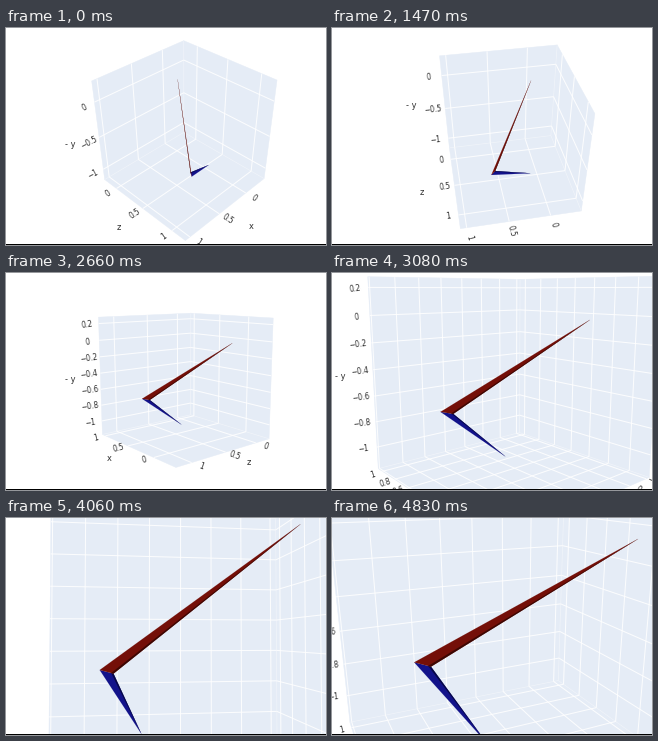
Write a matplotlib script that moves like this. It is 320 px wide and 217 px high and loops after 5.11 s.

```python
import itertools

import numpy as np
import matplotlib.pyplot as plt
from matplotlib.animation import FuncAnimation
from matplotlib.collections import LineCollection

W, H, DPI = 320, 217, 64
PX = 72 / DPI                      # points per pixel
FRAMES, STEP_MS = 73, 70
FOCAL, CENTRE = 473, np.array([178.5, 105.5])

WALL, INK = "#e5ecf6", "#303030"
RED, DARK_RED = "#740f08", "#3a0703"
BLUE, DARK_BLUE = "#12128a", "#070745"

# Data axes on the unit cube: position = ORIGIN + SCALE * value
ORIGIN, SCALE = np.array([-0.24, -0.335, 0.31]), 0.69
TITLES = ("x", "z", "- y")
BASE_EDGE = np.array([-0.039, -0.05, -0.011])

# Rough joint, red tip and blue tip, refined below
POINTS = np.array([[0.18, 0.26, -0.20], [-0.23, -0.30, 0.29], [-0.15, 0.14, -0.34]])

# Rough camera (azimuth, elevation, distance), then screen positions of the
# joint, the red tip and the blue tip, then those of some cube corners
POSES = [
    ((45, 35.3, 3.86), [(186, 147), (172, 56), (203, 137)],
     {"+-+": (85, 53), "--+": (178, 12), "-++": (272, 52),
      "-+-": (259, 150), "++-": (180, 212), "+--": (98, 150)}),
    ((79, 42, 3.86), [(161, 146), (197, 56), (200, 146)],
     {"+-+": (108, 28), "--+": (226, 17), "-++": (264, 86),
      "-+-": (250, 183), "++-": (128, 200)}),
    ((102.5, 22.5, 3.9), [(150, 136), (212, 63), (194, 152)],
     {"+++": (97, 60), "+-+": (135, 31), "--+": (246, 36),
      "-+-": (234, 195), "++-": (104, 183)}),
    ((133, 9, 2.5), [(114, 140), (259, 45), (175, 185)],
     {"+++": (37, 3), "+-+": (188, 10), "+--": (190, 155), "++-": (46, 198)}),
    ((163, 0.5, 1.62), [(95, 152), (301, 10), (143, 219)],
     {"++-": (25, 227), "+--": (250, 209)}),
    ((182, -4.6, 1.62), [(111, 156), (282, 0), (127, 214)],
     {"+++": (70, 8), "+-+": (293, 8)}),
    ((150, 20, 1.62), [(90, 147), (308, 19), (153, 220)], {}),
]


def camera_axes(cam):
    (sa, se), (ca, ce) = np.sin(cam[:2]), np.cos(cam[:2])
    eye = np.array([ca * ce, sa * ce, se])
    right = np.array([-sa, ca, 0])
    up = np.array([-ca * se, -sa * se, ce])
    return eye, right, up


def project(points, cam):
    """cam is azimuth, elevation (radians) and log distance."""
    eye, right, up = camera_axes(cam)
    points = np.asarray(points, float)
    zoom = FOCAL / (np.exp(cam[2]) - points @ eye)
    flat = np.stack([points @ right, -(points @ up)], axis=-1)
    return CENTRE + flat * zoom[..., None]


def corner(signs):
    return [0.5 if s == "+" else -0.5 for s in signs]


def calibrate():
    """Refine cameras and points together by Gauss-Newton least squares."""
    cams = [(np.radians(a), np.radians(e), np.log(d)) for (a, e, d), *_ in POSES]
    start = np.concatenate([np.ravel(cams), POINTS.ravel()])
    split = 3 * len(POSES)

    def errors(p):
        points = p[split:].reshape(3, 3)
        out = [30 * (p - start)]
        for cam, (_, tips, corners) in zip(p[:split].reshape(-1, 3), POSES):
            world = list(points) + [corner(c) for c in corners]
            seen = np.array(tips + list(corners.values()))
            out.append((project(world, cam) - seen).ravel())
        return np.concatenate(out)

    p, h = start.copy(), 1e-5
    for _ in range(12):
        r = errors(p)
        jac = np.array([(errors(p + h * e) - r) / h for e in np.eye(p.size)]).T
        p = p - np.linalg.lstsq(jac, r, rcond=None)[0]
    return p[:split].reshape(-1, 3), p[split:].reshape(3, 3)


cams, (joint, red_tip, blue_tip) = calibrate()
turned = np.array([*cams[3][:2], cams[2][2]])
zoomed = turned + 1.2 * (cams[3] - turned)
PATH = [(0, cams[0]), (630, cams[0]), (1470, cams[1]), (2170, cams[2]),
        (2520, turned), (2730, turned), (3150, zoomed), (3360, zoomed),
        (3780, cams[4]), (4410, cams[5]), (4830, cams[6])]
PATH_TIMES = [t for t, _ in PATH]
PATH_CAMS = np.array([c for _, c in PATH])


def camera_at(ms):
    return np.array([np.interp(ms, PATH_TIMES, PATH_CAMS[:, i]) for i in range(3)])


def ticks(axis, step):
    low, high = (np.array([-0.5, 0.5]) - ORIGIN[axis]) / SCALE
    return [round(k * step, 1) + 0.0
            for k in range(int(np.ceil(low / step)), int(np.floor(high / step)) + 1)]


def at(axis, value):
    return ORIGIN[axis] + SCALE * value


def with_axis(point, axis, value):
    moved = np.array(point, float)
    moved[axis] = value
    return moved


fig = plt.figure(figsize=(W / DPI, H / DPI), dpi=DPI, facecolor="white")
ax = fig.add_axes([0, 0, 1, 1])


def draw_faces(cam, back, steps):
    grid, edges = [], []
    for axis in range(3):
        i, j = [k for k in range(3) if k != axis]

        def on_face(u, v):
            p = np.empty(3)
            p[[axis, i, j]] = back[axis], u, v
            return p

        square = [on_face(u, v) for u, v in
                  ((-0.5, -0.5), (0.5, -0.5), (0.5, 0.5), (-0.5, 0.5))]
        ax.fill(*project(square, cam).T, color=WALL, lw=0.5)
        for t in ticks(i, steps[i]):
            grid.append(project([on_face(at(i, t), v) for v in (-0.5, 0.5)], cam))
        for t in ticks(j, steps[j]):
            grid.append(project([on_face(u, at(j, t)) for u in (-0.5, 0.5)], cam))
        edges.append(project([with_axis(back, axis, v) for v in (-0.5, 0.5)], cam))
    for lines, lw, alpha in ((grid, 1.05, 0.85), (edges, 0.7, 0.4)):
        ax.add_collection(LineCollection(lines, colors="white", alpha=alpha,
                                         linewidths=lw * PX), autolim=False)


def draw_spike(cam, tip, color, dark):
    a, b, t = project([joint - BASE_EDGE / 2, joint + BASE_EDGE / 2, tip], cam)
    for shape, fill in (([a, b, t], color), ([b, b + 0.16 * (a - b), t], dark)):
        ax.fill(*np.transpose(shape), color=fill, lw=0.1, zorder=3)


def write(pos, text, size, angle=0):
    if -20 < pos[0] < W + 20 and -20 < pos[1] < H + 20:
        ax.text(*pos, text, color=INK, fontsize=size * PX, rotation=angle,
                family="DejaVu Sans", ha="center", va="center")


def draw_axis(cam, axis, middle, outward, step):
    """Tick labels and title along the cube edge through middle."""
    inner = with_axis(middle, outward, -middle[outward])
    pull = project(middle, cam) - project(inner, cam)
    length = np.hypot(*pull)
    pull = pull / length
    angle = -np.degrees(np.arctan2(pull[1], pull[0]))
    angle = (angle + 90) % 180 - 90
    reach = min(13.5 if axis == 2 else 10, 5 + 0.07 * length)
    for t in ticks(axis, step):
        spot = project(with_axis(middle, axis, at(axis, t)), cam)
        write(spot + pull * reach, f"{t:g}".replace("-", "\u2212"), 7.5, angle)
    edge = project([with_axis(middle, axis, v) for v in (-0.5, 0.5)], cam)
    write(edge.mean(axis=0) + pull * min(33, 12 + 0.2 * length), TITLES[axis], 8.3)


def upright_edge(cam):
    """Leftmost vertical edge and the axis its labels move out along."""
    mids = [np.array([a, b, 0]) for a, b in itertools.product((-0.5, 0.5), repeat=2)]
    middle = min(mids, key=lambda m: project(m, cam)[0])

    def score(axis):
        dx, dy = project(middle, cam) - project(with_axis(middle, axis, -middle[axis]), cam)
        return dy - dx / 2

    return middle, max((0, 1), key=score)


def draw(frame):
    cam = camera_at(frame * STEP_MS)
    eye = camera_axes(cam)[0]
    front = np.where(eye > 0, 0.5, -0.5)
    back = -front

    ax.clear()
    ax.set(xlim=(0, W), ylim=(H, 0))
    ax.axis("off")

    upright, outward = upright_edge(cam)
    ends = project([with_axis(upright, 2, v) for v in (-0.5, 0.5)], cam)
    flat_step = 0.5 if np.exp(cam[2]) > 3.3 else 0.2
    tall_step = 0.2 if np.hypot(*(ends[1] - ends[0])) > 110 else 0.5
    steps = (flat_step, flat_step, tall_step)

    draw_faces(cam, back, steps)
    draw_spike(cam, blue_tip, BLUE, DARK_BLUE)
    draw_spike(cam, red_tip, RED, DARK_RED)
    draw_axis(cam, 0, np.array([0, front[1], back[2]]), 1, steps[0])
    draw_axis(cam, 1, np.array([front[0], 0, back[2]]), 0, steps[1])
    draw_axis(cam, 2, upright, outward, steps[2])
    ax.fill([0, W, W, 0], [H - 1.4, H - 1.4, H, H], color="black", lw=0, zorder=9)
    return []


anim = FuncAnimation(fig, draw, frames=FRAMES, interval=STEP_MS,
                     init_func=lambda: [], repeat=True, repeat_delay=0)
plt.show()
```
